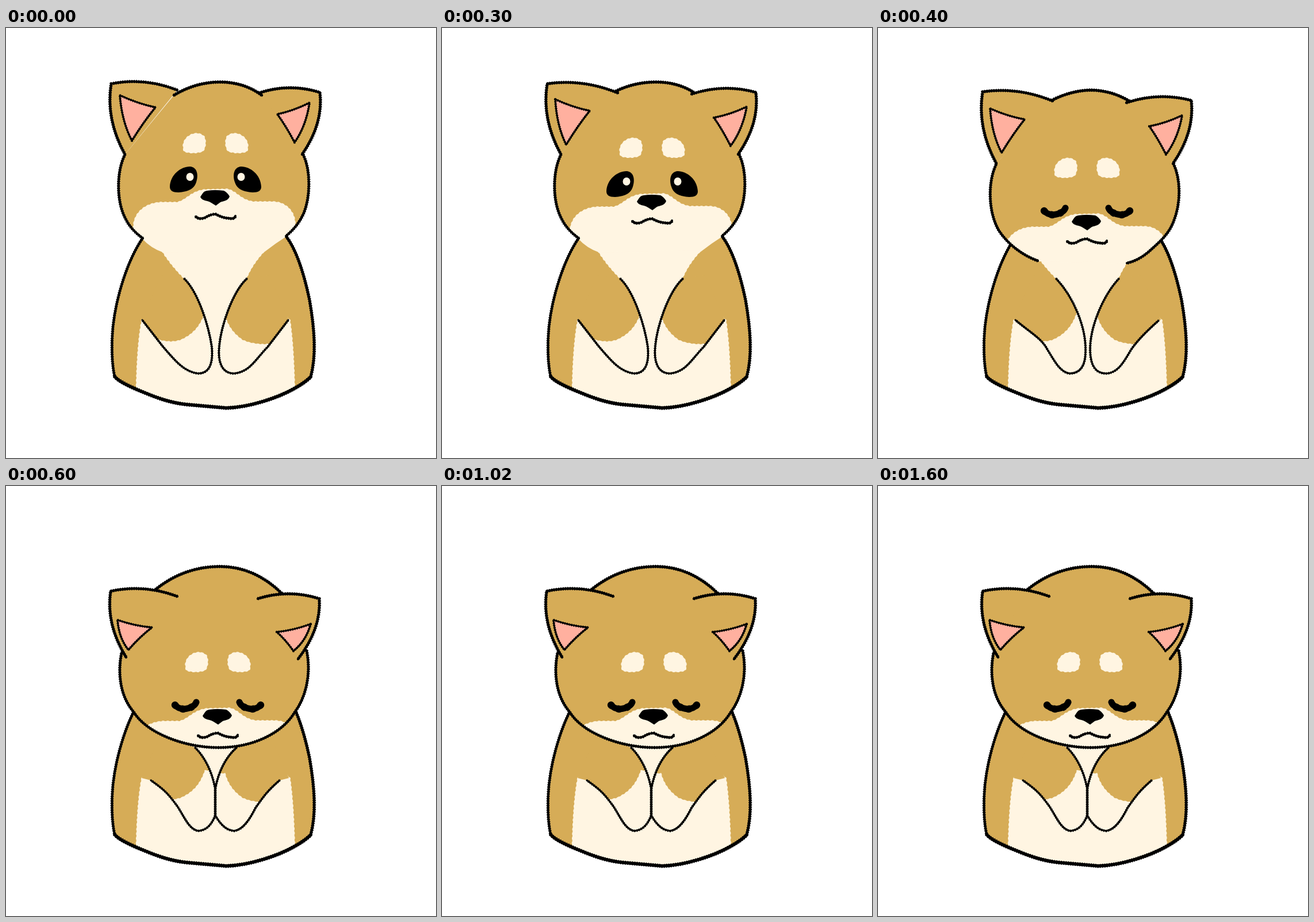
Animation, 748 px wide and 748 px high, one loop 1800 ms. Source, as an HTML page with a canvas:

```html
<!DOCTYPE html>
<html lang="en">
<head>
<meta charset="utf-8">
<title>Bowing puppy</title>
<style>
html, body { margin: 0; width: 100%; height: 100%; overflow: hidden; background: #fff; }
canvas { display: block; width: 100vw; height: 100vh; }
</style>
</head>
<body>
<canvas id="stage" width="748" height="748"></canvas>
<script>
const ctx = document.getElementById('stage').getContext('2d');
const TAN = '#d6ac57', CREAM = '#fff5e2', PINK = '#ffb09f', INK = '#000';
const LOOP = 1800;
const MIRROR = 729;

const bodySide = {
  left: 'M238 365 C212 403 192 465 186 520 C183 550 184 585 189 606',
  bottom: 'C194 614 220 626 240 634 C262 643 285 652 315 655 Q350 658 383 661 C425 660 475 642 500 628 Q520 617 530 607',
  right: 'C540 570 537 525 528 473 C519 430 505 385 487 362'
};
const body = new Path2D(bodySide.left + bodySide.bottom + bodySide.right + 'Z');
const belly = new Path2D('M236 508 Q226 560 226 670 L503 670 Q502 560 494 508 L418 436 Q430 408 452 386 L270 386 Q286 412 310 436 Z');
const paws = [
  new Path2D('M258 540 Q284 549 303 543 Q335 530 346 495 L380 495 L380 620 L250 620 Z'),
  new Path2D('M381 500 Q388 527 412 543 Q435 553 464 549 L480 620 L340 620 L340 500 Z')
];
const face = new Path2D('M215 420 L222 340 C226 315 250 302 275 303 L298 303 C314 299 322 284 345 281 L385 280 C402 284 408 299 430 302 L465 302 C490 303 503 322 503 340 L515 420 Z');
const brow = new Path2D('M308 205 C309 185 335 177 345 189 C349 199 347 208 343 214 C335 218 318 219 309 214 Z');
const openEye = new Path2D('M285 276 C286 255 304 241 320 241 C333 242 335 256 331 268 C327 281 315 285 300 286 C290 286 285 283 285 276 Z');
const shutEye = new Path2D('M290 275 Q296 282 306 282 C317 281 325 276 327 270');
const nose = new Path2D('M338 294 C342 288 343 284 350 283 Q363 281 379 283 Q385 286 389 293 C386 301 378 301 373 303 L365 309 L357 304 C350 299 342 302 338 294 Z');
const mouth = new Path2D('M330 328 Q336 334 346 330 Q358 323 365 324 Q378 331 388 331 Q398 333 399 327');

const armsOpen = [
  'M310 436 C335 460 353 520 358 555 C361 590 350 601 334 601 C310 598 295 580 272 553 L237 508',
  'M419 436 C393 460 374 520 371 553 C368 580 375 601 397 601 C425 598 435 575 455 555 L491 508'
];
const armsNear = [
  'M310 436 C340 468 362 520 361 562 C361 590 350 601 333 601 C315 598 305 575 295 560 C285 540 265 530 239 508',
  'M419 436 C392 465 368 520 369 562 C370 590 380 601 397 601 C418 600 428 580 440 560 C452 542 470 525 488 509'
];
const leftPaw = 'L364 573 C358 588 350 599 334 600 C318 597 310 575 298 557 C282 535 ';
const rightPaw = 'L364 573 C375 592 385 599 397 600 C413 598 425 578 434 560 C448 540 ';
const armsShut = [
  'M310 436 C335 465 352 497 364 527' + leftPaw + '260 525 240 509',
  'M419 436 C390 465 374 495 364 527' + rightPaw + '470 525 488 509'
];
const armsLow = [
  'M329 455 C348 474 359 500 364 527' + leftPaw + '275 528 252 512',
  'M401 455 C380 474 369 500 364 527' + rightPaw + '455 530 476 512'
];

// ears: [inner end, tip, base], pinks: [upper, inner, lower]
const upright = {
  right: '517 220 C531 250 529 295 518 322 Q508 345 487 362',
  left: '238 366 Q216 350 207 330 C192 300 192 250 207 220',
  chin: 'Q468 374 450 388 L275 390 Q252 382 238 366'
};
const poses = [
  { at: 0, shift: [0, 0], arms: armsOpen, ...upright,
    top: '292 117 Q330 94 372 94 Q414 94 445 117',
    ears: [[298, 108, 183, 97, 207, 220], [440, 113, 546, 112, 515, 220]],
    pinks: [[198, 117, 260, 138, 219, 196], [528, 130, 472, 150, 502, 199]] },
  { at: 300, shift: [1, 8], arms: armsOpen, ...upright,
    top: '302 110 Q335 94 372 94 Q410 94 438 112',
    ears: [[306, 113, 183, 97, 207, 220], [434, 115, 546, 112, 515, 220]],
    pinks: [[197, 124, 257, 144, 216, 203], [530, 137, 473, 156, 502, 205]] },
  { at: 400, shift: [-1, 43], shut: true, arms: armsNear,
    top: '302 126 Q335 109 369 108 Q405 108 437 127',
    right: '514 236 C526 262 528 302 514 337 C505 360 490 372 470 390 Q452 405 433 409',
    left: '278 405 C250 395 225 375 210 352 C192 320 190 270 206 236',
    chin: 'L278 405',
    ears: [[304, 127, 182, 111, 206, 236], [432, 130, 545, 126, 513, 236]],
    pinks: [[195, 140, 255, 159, 215, 217], [529, 152, 472, 171, 501, 220]] },
  { at: 500, shift: [3, 71], shut: true, arms: armsShut,
    top: '268 157 Q315 126 369 125 Q425 127 468 162',
    right: '518 264 C530 300 520 350 500 380 C480 410 450 430 402 436',
    left: '332 436 C285 432 240 412 218 382 C195 350 190 300 202 266',
    chin: 'L332 436',
    ears: [[299, 167, 182, 157, 205, 268], [437, 171, 545, 171, 515, 268]],
    pinks: [[194, 196, 254, 211, 214, 256], [529, 206, 471, 221, 500, 257]] },
  { at: 600, shift: [4, 106], shut: true, arms: armsLow,
    top: '260 180 Q310 140 372 140 Q432 140 480 187',
    right: '523 286 C532 330 520 370 502 394 C480 430 430 455 370 455',
    left: '370 455 C310 455 245 430 222 393 C198 365 194 325 201 290',
    chin: 'L370 455',
    ears: [[298, 192, 182, 183, 209, 298], [438, 196, 545, 196, 508, 301]],
    pinks: [[194, 233, 254, 246, 213, 285], [530, 240, 471, 254, 500, 287]] }
];

function stroke(path, width, color = INK, dash = []) {
  ctx.strokeStyle = color;
  ctx.lineWidth = width;
  ctx.setLineDash(dash);
  ctx.stroke(path);
}

// dry-brush edge: a solid core with a slightly wider broken line
function ink(path, width) {
  stroke(path, width - 0.5);
  ctx.lineCap = 'butt';
  stroke(path, width + 1, INK, [1.5, 2.5]);
  ctx.lineCap = 'round';
}

function fill(path, color) {
  ctx.fillStyle = color;
  ctx.fill(path);
}

function soft(path, color) {
  fill(path, color);
  stroke(path, 1.5, color, [3, 5]);
}

function inside(path, draw) {
  ctx.save();
  ctx.clip(path);
  draw();
  ctx.restore();
}

function bothSides(draw) {
  draw();
  ctx.save();
  ctx.translate(MIRROR, 0);
  ctx.scale(-1, 1);
  draw();
  ctx.restore();
}

function earLine([ex, ey, tx, ty, bx, by], side) {
  return `M${ex} ${ey} Q${(ex + tx) / 2} ${(ey + ty) / 2 - 17} ${tx} ${ty}` +
    ` Q${(tx + bx) / 2 + side * 22} ${(ty + by) / 2} ${bx} ${by}`;
}

function pinkShape([ax, ay, bx, by, cx, cy], side) {
  return new Path2D(`M${ax} ${ay} Q${(ax + bx) / 2} ${(ay + by) / 2 + 4} ${bx} ${by}` +
    ` Q${(bx + cx) / 2} ${(by + cy) / 2 - 4} ${cx} ${cy}` +
    ` Q${(cx + ax) / 2 + side * 7} ${(cy + ay) / 2 + 6} ${ax} ${ay} Z`);
}

function drawBody(pose) {
  fill(body, TAN);
  inside(body, () => soft(belly, CREAM));
  pose.arms.forEach((line, i) => {
    const arm = new Path2D(line + (i ? 'L492 508 L458 430 Z' : 'L236 508 L270 430 Z'));
    fill(arm, TAN);
    inside(arm, () => soft(paws[i], CREAM));
  });
  pose.arms.forEach(line => ink(new Path2D(line), 3.6));
  ink(new Path2D(bodySide.left), 4.5);
  ink(new Path2D('M189 606' + bodySide.bottom), 6);
  ink(new Path2D('M530 607' + bodySide.right), 5);
}

function drawFace(pose) {
  bothSides(() => {
    soft(brow, CREAM);
    if (pose.shut) {
      stroke(shutEye, 11);
      stroke(shutEye, 12.5, INK, [1, 14]);
    } else {
      fill(openEye, INK);
      ctx.fillStyle = CREAM;
      ctx.beginPath();
      ctx.ellipse(320, 259, 6.5, 7, 0, 0, 7);
      ctx.fill();
    }
  });
  fill(nose, INK);
  ink(mouth, 4.5);
}

function drawHead(pose) {
  const { top, right, left, chin } = pose;
  const head = new Path2D(`M${top} L${right} ${chin} L${left} Z`);
  const ears = pose.ears.map((e, i) => earLine(e, i ? 1 : -1));
  ears.forEach(e => fill(new Path2D(e + 'Z'), TAN));
  fill(head, TAN);
  inside(head, () => {
    ctx.translate(...pose.shift);
    soft(face, CREAM);
  });
  const [rx, ry] = right.split(' ').slice(-2);
  stroke(new Path2D(`M${rx} ${ry} ${chin}`), 2, CREAM);
  ink(new Path2D('M' + top), 5);
  ink(new Path2D('M' + right), 4.6);
  ink(new Path2D('M' + left), 4.6);
  ears.forEach(e => ink(new Path2D(e), 4.8));
  pose.pinks.forEach((p, i) => {
    const shape = pinkShape(p, i ? 1 : -1);
    fill(shape, PINK);
    ink(shape, 3.4);
  });
  ctx.save();
  ctx.translate(...pose.shift);
  drawFace(pose);
  ctx.restore();
}

let shown;
function frame(now) {
  const t = now % LOOP;
  const pose = poses.filter(p => p.at <= t).pop();
  if (pose !== shown) {
    shown = pose;
    ctx.fillStyle = '#fff';
    ctx.fillRect(0, 0, 748, 748);
    drawBody(pose);
    drawHead(pose);
  }
  requestAnimationFrame(frame);
}

ctx.lineCap = ctx.lineJoin = 'round';
frame(0);
</script>
</body>
</html>
```
